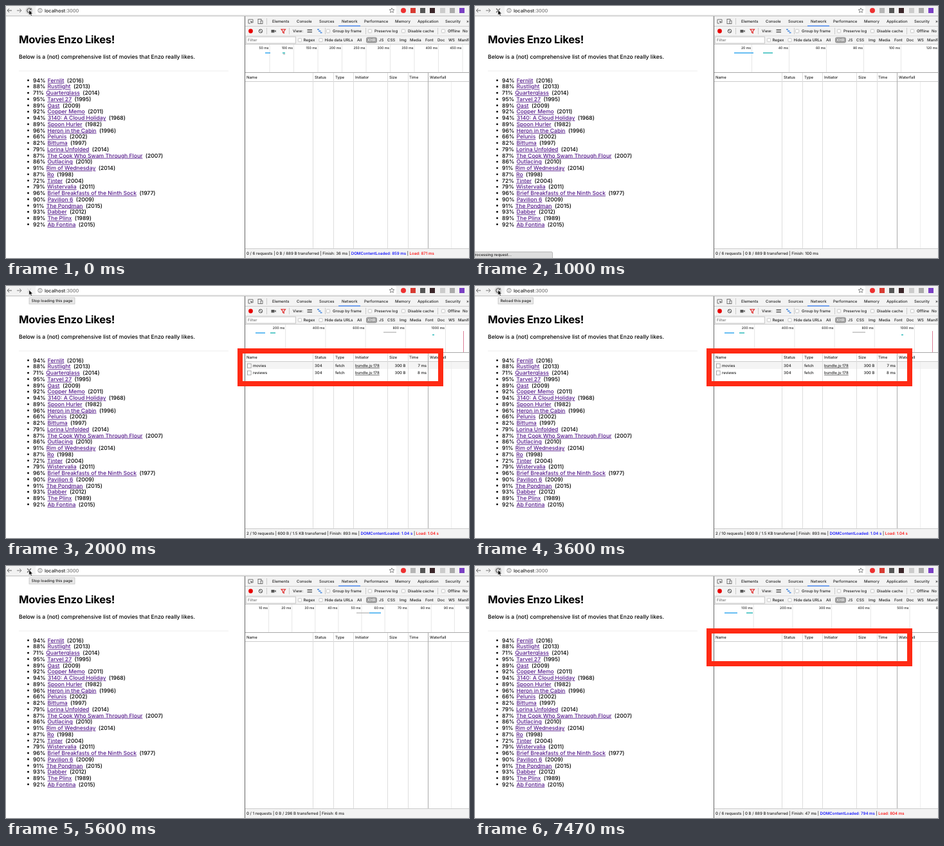
Animation, 720 px wide and 392 px high, one loop 7600 ms. Source, as an HTML page:

```html
<!DOCTYPE html>
<html lang="en">
<head>
<meta charset="utf-8">
<title>Movie list reload</title>
<style>
html, body { margin: 0; width: 100%; height: 100%; overflow: hidden; background: #fff; }
svg { display: block; width: 720px; height: 392px; font: 500 6.03px Inter, Arial, sans-serif; text-rendering: geometricPrecision; }
text { fill: #222; }
.page { font-size: 8.58px; }
.page text { fill: #000; }
.page .link { fill: #551a8b; text-decoration: underline; }
</style>
</head>
<body>
<svg id="stage" viewBox="0 0 720 392"></svg>
<script>
const LOOP = 7600;
const stage = document.getElementById('stage');

const movies = `94|Fernlit|2016
88|Rustlight|2013
71|Quarterglass|2014
95|Tarvel 27|1995
89|Oast|2009
92|Copper Memo|2011
94|3140: A Cloud Holiday|1968
89|Spoon Hurler|1982
96|Heron in the Cabin|1996
66|Pelunis|2002
82|Bittuma|1997
79|Lorina Unfolded|2014
87|The Cook Who Swam Through Flour|2007
86|Outlacing|2010
91|Rim of Wednesday|2014
87|Ro|1998
72|Tinter|2004
79|Wistervalia|2011
96|Brief Breakfasts of the Ninth Sock|1977
90|Pavilion 6|2009
91|The Pondman|2015
93|Dabber|2012
89|The Plinx|1989
92|Ab Fontina|2015`.split('\n').map(row => row.split('|'));

// SVG helpers
const text = (x, y, s, attrs = '') => `<text x="${x}" y="${y}" ${attrs}>${s}</text>`;
const box = (x, y, w, h, fill, attrs = '') =>
  `<rect x="${x}" y="${y}" width="${w}" height="${h}" fill="${fill}" ${attrs}/>`;
const path = (d, stroke, width = 1, fill = 'none') =>
  `<path d="${d}" stroke="${stroke}" stroke-width="${width}" fill="${fill}"/>`;
const dot = (x, y, r, fill, attrs = '') => `<circle cx="${x}" cy="${y}" r="${r}" fill="${fill}" ${attrs}/>`;
const vline = (x, top, bottom, color = '#ccc') => path(`M${x} ${top}V${bottom}`, color);
const hline = (y, left, right, color = '#ccc') => path(`M${left} ${y}H${right}`, color);
const check = (x, y) => box(x - 2.6, y - 2.6, 5.2, 5.2, '#fff', 'rx="1" stroke="#aaa" stroke-width=".6"');
const right = 'text-anchor="end"';

const blue = '#29a3ee', teal = '#1fb5b5', gray = '#bbb';

// Timeline scales: gridline spacing, ms per gridline, bars as [x, y, width, colour]
const scales = {
  first: { gap: 37.5, ms: 50, bars: [[403, 73, 8, blue], [430, 73, 4, teal], [431, 75, 3, gray]] },
  empty: { gap: 36.1, ms: 10, bars: [] },
  start: { gap: 36.1, ms: 10, bars: [[545, 73, 20, gray], [565, 73, 18, blue]] },
  assets: { gap: 58, ms: 20, bars: [[403, 73, 30, blue], [448, 73, 15, teal]] },
  fetched: { gap: 62.2, ms: 200, load: 711.5,
    bars: [[388, 73, 15, blue], [411, 73, 8, teal], [587, 72, 20, gray], [663, 76, 3, teal]] },
  cached: { gap: 60.7, ms: 100, bars: [[388, 73, 20, blue], [422, 73, 10, teal]] }
};
const sum = (requests, size, finish) =>
  `${requests} requests | ${size} transferred | Finish: ${finish} ms`;
const stopTip = 'Stop loading this page';

// Each cue overrides part of the state from its time on.
const cues = [
  [0, { icon: 'reload', ready: true, page: true, rows: false, frame: false, tip: '', bubble: '',
        scale: 'first', status: sum('0 / 6', '0 B / 889 B', 36), load: ['859 ms', '871 ms'] }],
  [400, { icon: 'stop', ready: false }],
  [470, { scale: 'empty', status: '', load: null }],
  [540, { bubble: 'Waiting for localhost...' }],
  [670, { scale: 'start', status: sum('0 / 1', '0 B / 296 B', 6) }],
  [870, { bubble: 'Processing request...' }],
  [935, { scale: 'assets', status: sum('0 / 6', '0 B / 889 B', 100) }],
  [1130, { page: false }],
  [1265, { page: true }],
  [1330, { rows: true, scale: 'fetched', status: sum('2 / 10', '600 B / 1.5 KB', 893) }],
  [1470, { icon: 'faint', load: ['1.04 s', '1.04 s'] }],
  [1600, { bubble: '', ready: true }],
  [1870, { tip: stopTip }],
  [2000, { frame: true }],
  [2800, { icon: 'reload', tip: '' }],
  [3070, { tip: 'Reload this page' }],
  [5130, { frame: false, tip: '' }],
  [5200, { icon: 'stop', ready: false }],
  [5270, { rows: false, scale: 'empty', status: '', load: null }],
  [5400, { scale: 'start', status: sum('0 / 1', '0 B / 296 B', 6) }],
  [5600, { tip: stopTip }],
  [5800, { scale: 'assets', status: sum('0 / 6', '0 B / 889 B', 47) }],
  [5930, { scale: 'cached' }],
  [6130, { icon: 'faint', ready: true, load: ['794 ms', '804 ms'] }],
  [6530, { frame: true }],
  [7470, { icon: 'reload', tip: '' }]
];

function browserBar({ icon, ready }) {
  const cross = path('M33 4l6 6M39 4l-6 6', icon === 'stop' ? '#555' : '#ddd', 1.1);
  const reload = dot(36, 7, 6, '#dcdcdc') +
    path('M38.6 5A3.3 3.3 0 1 0 39.3 7.6', '#555', 1.1) + path('M39.6 3v3h-3z', 'none', 0, '#555');
  const star = Array.from({ length: 10 }, (_, i) => {
    const r = i % 2 ? 1.8 : 4, a = i * Math.PI / 5;
    return `${600 + r * Math.sin(a)} ${7 - r * Math.cos(a)}`;
  }).join('L');
  return box(0, 0, 720, 15, '#f2f2f2') + box(46, 0, 561, 13, '#fff', 'rx="2"') + hline(15.5, 0, 720, '#bbb') +
    path('M9 7H2M5 4L2 7l3 3', '#666') + path('M17 7h7M21 4l3 3-3 3', '#777') +
    (icon === 'reload' ? reload : cross) +
    dot(53, 7, 3.2, 'none', 'stroke="#666" stroke-width=".8"') + path('M53 6.5v2.3M53 4.8v.9', '#666', .9) +
    text(60, 9.7, 'localhost<tspan fill="#777">:3000</tspan>', 'font-size="7.4"') +
    path(`M${star}Z`, '#666', .8) +
    dot(618, 7, 4, '#ee3030') + box(629, 3, 8, 8, ready ? '#d83a32' : '#b5b5b5') +
    box(644, 3, 8, 8, '#555') + box(659, 3, 8, 8, '#3a2528') +
    box(675, 3, 8, 8, '#ccc') + box(690, 3, 8, 8, '#aaa') + box(705, 3, 8, 8, '#7a3fc4');
}

function page() {
  const items = movies.map(([score, title, year], i) => {
    const y = 118.7 + i * 9.74;
    return dot(34.5, y - 3, 1.4, '#000') +
      text(42, y, `${score}%<tspan class="link" dx="3.2">${title}</tspan><tspan dx="4.4">(${year})</tspan>`);
  });
  return `<g class="page">` +
    text(20, 58.3, 'Movies Enzo Likes!', 'font-size="16.6" font-weight="700" letter-spacing="-.3"') +
    text(20, 82.3, 'Below is a (not) comprehensive list of movies that Enzo really likes.') +
    hline(101, 20, 346, '#eee') + items.join('') + '</g>';
}

function toolbars() {
  const put = (y, list) => list.map(([x, s, attrs]) => text(x, y, s, attrs)).join('');
  return box(372, 16, 348, 43, '#f3f3f3') +
    hline(31.5, 372, 720) + hline(46.5, 372, 720, '#ddd') + hline(59.5, 372, 720) +
    // tabs
    path('M383 26h1V21h-7v6h3', '#666', .9) + path('M380 23l4 2-2 .6-.6 2z', 'none', 0, '#555') +
    box(392, 20.5, 5, 7, 'none', 'stroke="#666" stroke-width=".9"') +
    box(396, 23, 3, 4.5, '#f3f3f3', 'stroke="#666" stroke-width=".9"') +
    vline(405.5, 19, 29) + box(517, 30.3, 34, 1.4, '#4285f4') +
    put(26.2, [[414, 'Elements'], [452, 'Console'], [487, 'Sources'], [522, 'Network'], [557, 'Performance'],
      [605, 'Memory'], [640, 'Application'], [683, 'Security'], [716, '»']]) +
    // recording controls
    dot(380.5, 39, 3.4, '#e80000') +
    dot(396, 39, 2.8, 'none', 'stroke="#555" stroke-width="1"') + path('M394 37l4 4', '#555') +
    box(412.5, 37, 5, 4.4, '#555') + path('M417.5 39l2.2-1.8v3.8z', 'none', 0, '#555') +
    path('M428 36.2h6.5l-2.3 3v3l-1.8-1v-2z', '#e02020', 1.1) +
    [405.5, 440.5, 496.5, 559.5, 671.5].map(x => vline(x, 34, 44)).join('') +
    path('M468.5 37.3h7.5M468.5 40.6h7.5', '#555', 1.5) +
    path('M484 36.5h3M486 39h3.5M488.5 41.5h3', '#3b82e0', 1.4) +
    [501, 566, 618, 680].map(x => check(x, 39)).join('') +
    put(41.2, [[446, 'View:'], [508, 'Group by frame'], [573, 'Preserve log'], [625, 'Disable cache'],
      [687, 'Offline'], [710, 'No throttling']]) +
    // filters
    box(373.5, 48, 77, 10, '#fff', 'stroke="#bbb" stroke-width=".8"') +
    check(457, 53) + check(489.5, 53) + box(560, 48.6, 17, 8.8, '#999', 'rx="3"') +
    put(55.2, [[376, 'Filter', 'style="fill:#777"'], [462.5, 'Regex'], [495.5, 'Hide data URLs'],
      [546, 'All'], [562, 'XHR', 'style="fill:#fff"'], [580, 'JS'], [593, 'CSS'], [612, 'Img'], [628, 'Media'],
      [652, 'Font'], [671, 'Doc'], [688, 'WS'], [703, 'Manifest']]);
}

function timeline({ scale }) {
  const { gap, ms, bars, load } = scales[scale];
  let out = '';
  for (let i = 1; 372.5 + i * gap < 740; i++) {
    const x = 372.5 + i * gap;
    out += vline(x, 60, 103, '#e6e6e6') + text(x - 1.5, 67, i * ms + ' ms', right + ' font-size="5.1"');
  }
  out += bars.map(([x, y, w, color]) => box(x, y - .7, w, 1.4, color)).join('');
  return out + (load ? vline(load, 70, 103, '#dd8098') : '');
}

function table({ rows }) {
  const row = (y, name, time) =>
    box(375.5, y - 5.2, 5.6, 6.2, '#fff', 'stroke="#888" stroke-width=".7"') +
    text(384, y, name) + text(480, y, '304') + text(512, y, 'fetch') +
    text(543, y, 'bundle.js:178', 'text-decoration="underline"') +
    text(621.5, y, '300 B', right) + text(654, y, time, right);
  const heads = { 374: 'Name', 480: 'Status', 512: 'Type', 543: 'Initiator', 596: 'Size', 627: 'Time', 659: 'Waterfall' };
  return (rows ? box(372, 118, 348, 11, '#f4f4f4') : '') +
    hline(103.5, 372, 720, '#aaa') + hline(117.5, 372, 720) +
    [477.5, 509.5, 540.5, 593.5, 625.5].map(x => vline(x, 104, 377, '#ddd')).join('') +
    vline(692.5, 118, 377, '#eee') + vline(656.5, 104, 377, '#aaa') +
    Object.entries(heads).map(([x, s]) => text(x, 113, s, 'font-size="5.95"')).join('') +
    (rows ? row(126.2, 'movies', '7 ms') + row(137.2, 'reviews', '8 ms') : '');
}

function summary({ status, load }) {
  const times = load ? ` | <tspan fill="#00f">DOMContentLoaded: ${load[0]}</tspan>` +
    ` | <tspan fill="#f00">Load: ${load[1]}</tspan>` : '';
  return box(372, 377, 348, 15, '#f3f3f3') + hline(377.5, 372, 720) +
    text(374, 387.2, status + times, 'font-size="6.15"');
}

function overlays({ frame, tip, bubble }) {
  let out = '';
  if (frame) out += box(364, 101, 312, 51, 'none', 'stroke="#ff2a14" stroke-width="8"');
  if (bubble) out += box(-2, 382.5, 122.5, 12, '#dedede', 'rx="1.5" stroke="#aaa" stroke-width=".8"') +
    text(-4, 389.3, bubble);
  if (tip) out += box(36, 18, tip === stopTip ? 71 : 54.5, 10, '#e9e9e9', 'stroke="#bbb" stroke-width=".7"') +
    text(39.5, 25.1, tip);
  return out + path('M35.8 6.3v8l1.9-1.7 1.2 2.7 1.4-.6-1.2-2.7h2.4z', '#fff', .6, '#000');
}

function draw(state) {
  stage.innerHTML = box(0, 0, 720, 392, '#fff') + browserBar(state) + (state.page ? page() : '') +
    toolbars() + timeline(state) + table(state) + summary(state) +
    vline(371.5, 16, 392, '#666') + overlays(state);
}

let shown = 0;
function tick() {
  const t = performance.now() % LOOP;
  const active = cues.filter(([start]) => start <= t);
  if (active.length !== shown) {
    shown = active.length;
    draw(Object.assign({}, ...active.map(([, change]) => change)));
  }
  requestAnimationFrame(tick);
}
tick();
</script>
</body>
</html>
```
